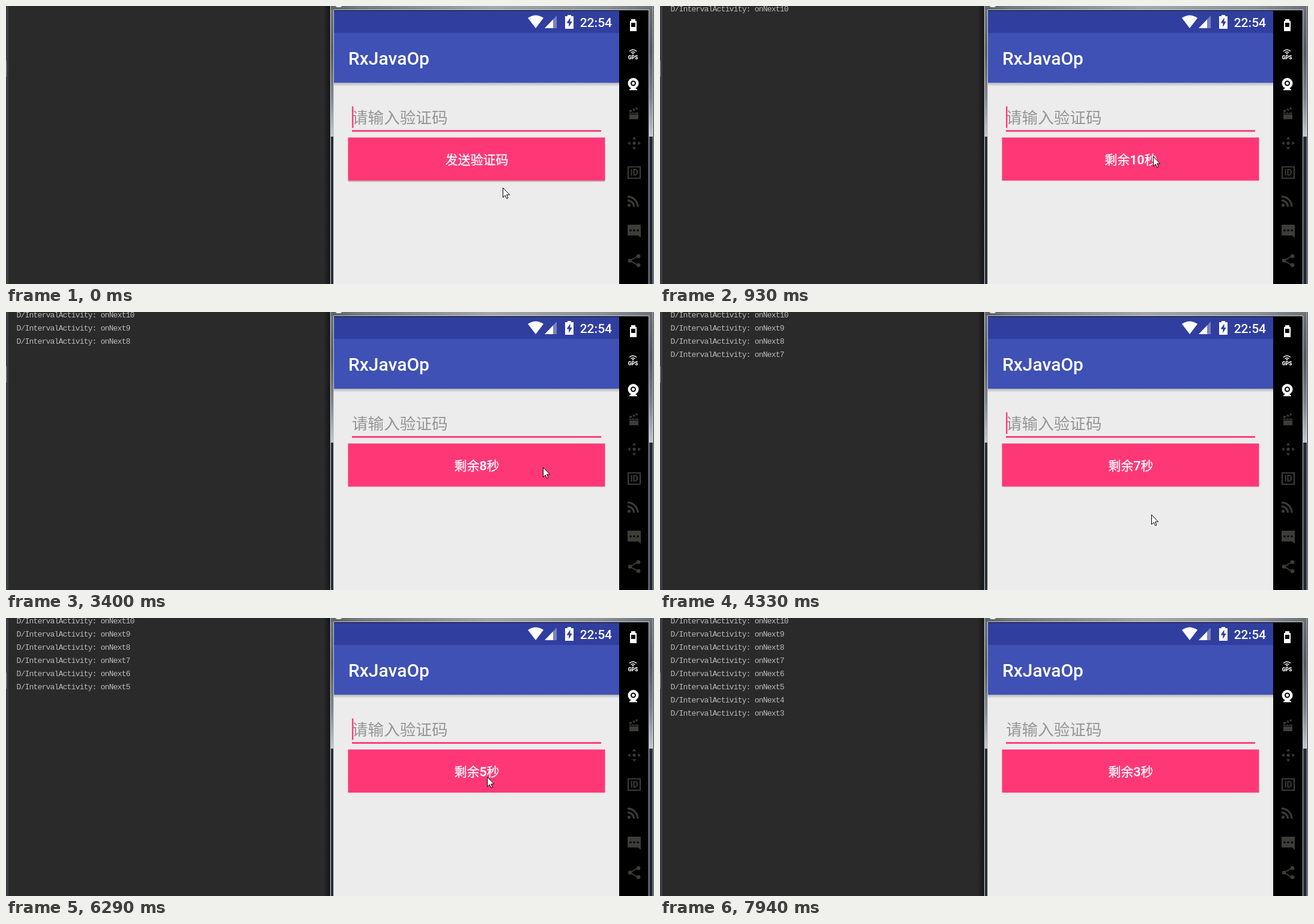
Animation, 1079 px wide and 464 px high, one loop 8000 ms. Source, as an HTML page:

```html
<!DOCTYPE html>
<html lang="zh">
<head>
<meta charset="utf-8">
<style>
  html, body { margin: 0; width: 100%; height: 100%; overflow: hidden; background: #2a2a2a; }
  svg { display: block; }
  text { white-space: pre; }
  .ui { font-family: Roboto, "Noto Sans CJK SC", "Noto Sans CJK", sans-serif; }
  .log { font: 13px "Liberation Mono", "Noto Sans Mono", monospace; letter-spacing: -.8px; fill: #bbb; }
</style>
</head>
<body>
<svg width="1079" height="464" viewBox="0 0 1079 464">
  <defs>
    <linearGradient id="edge"><stop stop-color="#2a2a2a"/><stop offset="1" stop-color="#171717"/></linearGradient>
    <linearGradient id="top">
      <stop stop-color="#5d6267"/><stop offset=".08" stop-color="#74797e"/>
      <stop offset=".5" stop-color="#a4a8ac"/><stop offset=".85" stop-color="#8b9096"/><stop offset="1" stop-color="#6c7177"/>
    </linearGradient>
    <linearGradient id="side" x2="0" y2="1">
      <stop stop-color="#6c7278"/><stop offset=".35" stop-color="#555b62"/>
      <stop offset=".7" stop-color="#7d848c"/><stop offset="1" stop-color="#c3c8ce"/>
    </linearGradient>
    <linearGradient id="drop" x2="0" y2="1"><stop stop-color="#b2b2b4"/><stop offset="1" stop-color="#ececec"/></linearGradient>
  </defs>

  <!-- console -->
  <path fill="#2a2a2a" d="M0 0h540v464H0z"/>
  <path fill="#3c3f41" d="M0 0h4v464H0z"/>
  <path fill="#85898c" d="M0 91h1v27H0z"/>
  <path fill="url(#edge)" d="M529 0h10v464h-10z"/>
  <g id="logs"></g>

  <!-- window frame -->
  <path fill="#272d35" d="M539 0h540v464H539z"/>
  <path fill="url(#side)" d="M541 0h4v218h-4zM1071 0h6v218h-6z"/>
  <path fill="url(#top)" d="M541 0h536v6H541z"/>
  <path fill="#c9cdd1" d="M540 0h1v464h-1zM545 6h1v458h-1zM545 6h526v1H545zM1070 6h1v458h-1zM1077 0h1v464h-1z"/>
  <path fill="#eee" d="M549 0a5 2 0 0 0 10 0z"/>
  <path d="M546 7h524v457H546z"/>

  <!-- app -->
  <path fill="#ececec" d="M546 128h475v336H546z"/>
  <path fill="#303f9f" d="M546 8h475v38H546z"/>
  <path fill="#3f51b5" d="M546 45h475v83H546z"/>
  <path fill="url(#drop)" d="M546 128h475v6H546z"/>
  <g fill="#fff" class="ui" font-weight="500">
    <path d="M869 20Q882 11 895 20L882 37z"/>
    <path fill-opacity=".35" d="M917 16v21H897z"/>
    <path d="M911 22.5V37H897z"/>
    <path d="M935 15h6v2h4v21h-14V17h4z"/>
    <path fill="#303f9f" d="M939.5 19.5l-6 9h3.700v6.500l5.500-9h-3.200z"/>
    <text x="1009" y="35" font-size="21" text-anchor="end">22:54</text>
    <text x="570" y="98" font-size="30">RxJavaOp</text>
  </g>
  <text class="ui" x="576" y="196" font-size="26.600" fill="#959595">请输入验证码</text>
  <path fill="#ff4081" d="M576 207h415v3H576z"/>
  <path id="caret" fill="#ff4081" d="M576 167.500h2.500v36H576z"/>
  <path id="shadow" fill="#bdbdbd" d="M570 291h427v2.500H570z"/>
  <path fill="#fe3877" d="M569.500 219.500h428v72h-428z"/>
  <text id="label" class="ui" x="784" y="263.500" font-size="21" font-weight="500" fill="#fff" stroke="#fff" stroke-width=".3" text-anchor="middle"></text>

  <!-- side bar -->
  <path id="hover" fill="#222" d="M1021 449h49v15h-49z"/>
  <g fill="#fff">
    <path fill-rule="evenodd" d="M1041 22h7v3h2v17h-11V25h2zM1041 28v7h7v-7z"/>
    <path fill="none" stroke="#fff" stroke-width="1.500" d="M1038 75.500q6-5 12 0M1040.500 78q3.500-3 7 0"/>
    <circle cx="1044" cy="79.500" r="1.200"/>
    <text x="1044" y="89" text-anchor="middle" font-size="8.500" font-weight="900" font-family="Roboto, sans-serif">GPS</text>
    <circle cx="1044.500" cy="129" r="9"/>
    <circle cx="1044.500" cy="129" r="3.500" fill="none" stroke="#000" stroke-width="2"/>
    <path d="M1043 136h3l5 3v1.500h-13V139z"/>
  </g>
  <g fill="#3d3d38">
    <path d="M1038 178h15v11h-15zM1038 174l3-1 2 3-5 1zM1043 172l3-1 2 3-3 1zM1048 170l3-1 1 3-3 1z"/>
    <path stroke="#000" d="M1038 180.500h15M1041 178l2 2M1046 178l2 2"/>
    <circle cx="1046" cy="229" r="2.500"/>
    <path d="M1046 218l3 4.500h-6zM1046 240l3-4.500h-6zM1035 229l4.500-3v6zM1057 229l-4.500-3v6z"/>
    <path fill="none" stroke="#3d3d38" stroke-width="2" d="M1036 268.500h20v19h-20z"/>
    <text x="1046" y="283" text-anchor="middle" font-size="14" font-weight="700" font-family="Roboto, sans-serif">ID</text>
    <circle cx="1037.500" cy="332.500" r="2.500"/>
    <path fill="none" stroke="#3d3d38" stroke-width="3" d="M1035 324.500a10.500 10.500 0 0 1 10.500 10.500M1035 318a17 17 0 0 1 17 17"/>
    <path d="M1035 365h22v22l-4-4h-18z"/>
    <path d="M1038.500 373h3v3h-3zM1044.500 373h3v3h-3zM1050.500 373h3v3h-3z" fill="#000"/>
    <path fill="none" stroke="#3d3d38" stroke-width="2" d="M1053 417l-14 8 14 8"/>
    <circle cx="1053" cy="417.500" r="3.300"/><circle cx="1039" cy="425" r="3.300"/><circle cx="1053" cy="432.500" r="3.300"/>
  </g>

  <path id="mouse" fill="#fff" stroke="#000" stroke-linejoin="round" d="M.5.5v16l3.700-3.400 2.500 5.400 2.300-1-2.400-5.400h5z"/>
</svg>
<script>
const $ = id => document.getElementById(id);
const LOOP = 8000, SECOND = 980, FIRST_TICK = 780, LOG_DELAY = 140;
const home = { x: 827, y: 303 };
const moves = [
  { at: 60, ms: 330, x: 821, y: 251 },
  { at: 1200, ms: 270, x: 826, y: 352 },
  { at: 1750, ms: 150, x: 847, y: 342 },
  { at: 2050, ms: 150, x: 894, y: 259 },
  { at: 3670, ms: 390, x: 818, y: 338 },
  { at: 5200, ms: 120, x: 809, y: 290 },
  { at: 5320, ms: 120, x: 801, y: 265 },
  { at: 6320, ms: 260, x: 806, y: 394 },
  { at: 6860, ms: 400, x: 1045, y: 480 }
];
const show = (el, on) => el.setAttribute("visibility", on ? "visible" : "hidden");
const ticksBy = t => Math.max(0, 1 + Math.floor((t - FIRST_TICK) / SECOND));

function pointer(t) {
  let { x, y } = home;
  for (const m of moves) {
    const k = Math.min(1, Math.max(0, (t - m.at) / m.ms));
    x += (m.x - x) * k;
    y += (m.y - y) * k;
  }
  return `translate(${Math.round(x)} ${Math.round(y)})`;
}

$("logs").innerHTML = Array.from({ length: ticksBy(LOOP) }, (_, i) =>
  `<text class="log" x="17.500" y="${9 + 22 * i}">D/IntervalActivity: onNext${10 - i}</text>`).join("");
const lines = [...$("logs").children];

function draw(t) {
  const count = ticksBy(t);
  const label = count ? `剩余${11 - count}秒` : "发送验证码";
  if ($("label").textContent !== label) $("label").textContent = label;
  lines.forEach((line, i) => show(line, i < ticksBy(t - LOG_DELAY)));
  show($("caret"), (t + 640) % 1010 >= 520);
  show($("shadow"), !count);
  show($("hover"), t >= 7260 && t < 7940);
  $("mouse").setAttribute("transform", pointer(t));
}

const start = performance.now();
function frame() {
  draw((performance.now() - start) % LOOP);
  requestAnimationFrame(frame);
}
frame();
</script>
</body>
</html>
```
